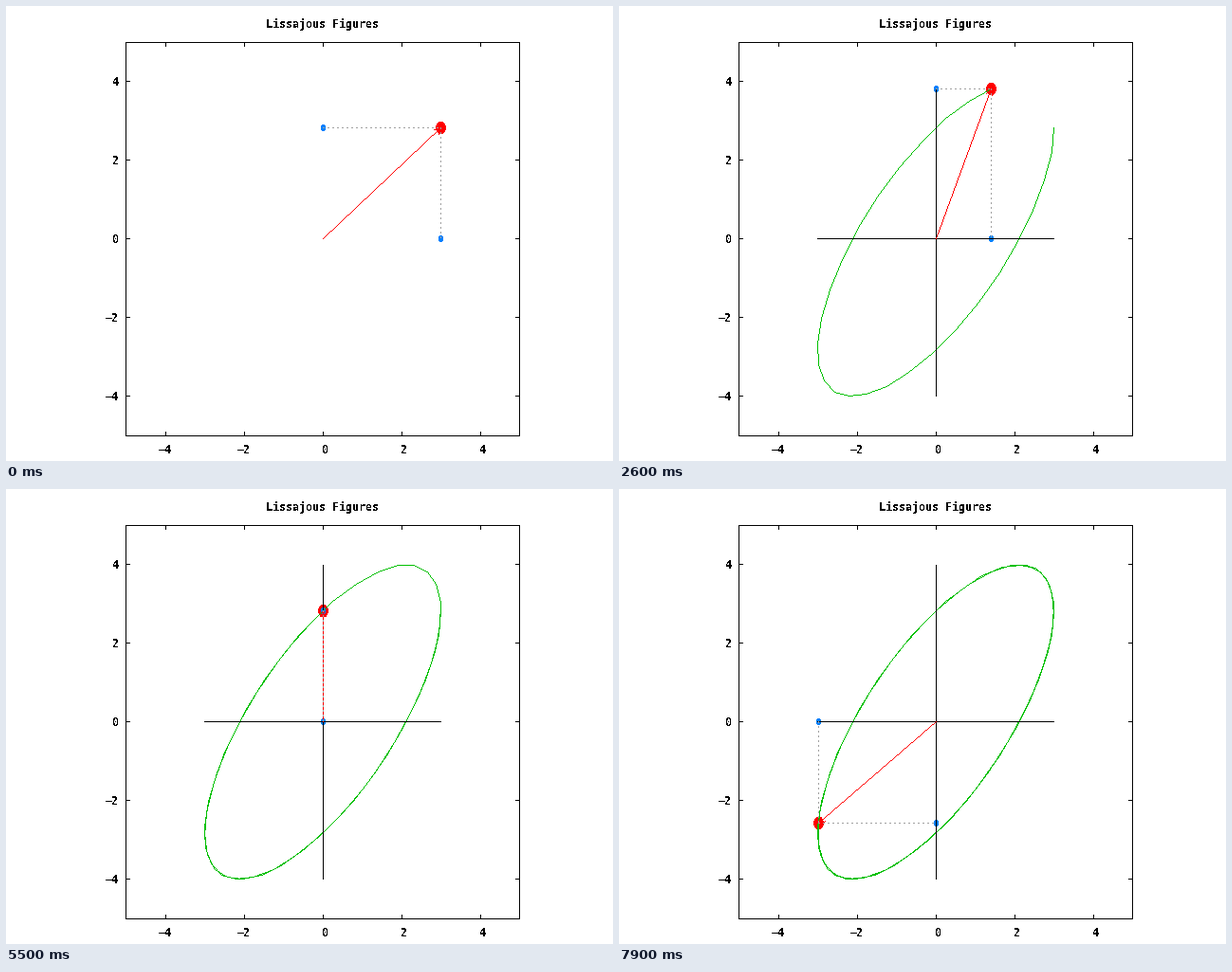
Write a matplotlib script that moves like this. It is 640x480 px and loops after 8 s.

```python
import numpy as np
import matplotlib.pyplot as plt
from matplotlib.animation import FuncAnimation
from matplotlib.collections import LineCollection

plt.rcParams.update({
    "text.antialiased": False,
    "font.family": "DejaVu Sans Mono",
    "font.weight": "bold",
    "font.size": 8.4,
})

FRAMES, STEP = 80, 0.2
LEFT, RIGHT, TOP, BOTTOM = 126, 541, 38, 453
SCALE = (RIGHT - LEFT) / 10
PX = 0.72  # one pixel in points at 100 dpi
RED, GREEN, BLUE, GREY = "#ff0000", "#00c000", "#0080ff", "#a0a0a0"

fig = plt.figure(figsize=(6.4, 4.8), dpi=100, facecolor="white")
ax = fig.add_axes([0, 0, 1, 1])
ax.set_xlim(0, 640)
ax.set_ylim(480, 0)
ax.axis("off")


def px(x):
    """Pixel column at data x."""
    return np.floor(LEFT + (np.asarray(x) + 5) * SCALE + 0.5)


def py(y):
    """Pixel row at data y."""
    return np.ceil(BOTTOM - (np.asarray(y) + 5) * SCALE - 0.5)


def raster(xs, ys):
    """Pixels of a one pixel wide polyline."""
    parts = [np.array([[xs[0], ys[0]]])]
    for x0, y0, x1, y1 in zip(xs[:-1], ys[:-1], xs[1:], ys[1:]):
        n = int(max(abs(x1 - x0), abs(y1 - y0))) + 1
        run = np.column_stack([np.linspace(x0, x1, n), np.linspace(y0, y1, n)])
        parts.append(np.floor(run + 0.5))
    return np.unique(np.vstack(parts), axis=0)


def dotted(xs, ys):
    """Two pixels on, three off, from the left or top end."""
    pts = raster(xs, ys)
    return pts[np.arange(len(pts)) % 5 < 2]


def disc(rx, ry):
    """Pixel offsets inside an upright ellipse."""
    span = np.arange(-8, 9)
    dx, dy = (g.ravel() for g in np.meshgrid(span, span))
    inside = (dx / rx) ** 2 + (dy / ry) ** 2 <= 1
    return np.column_stack([dx, dy])[inside]


def layer(color, z):
    art = LineCollection([], colors=color, linewidths=PX, zorder=z,
                         capstyle="butt", snap=False)
    return ax.add_collection(art, autolim=False)


def paint(art, pts):
    pts = np.asarray(pts, dtype=float)
    art.set_segments(np.stack([pts + (0, 0.5), pts + (1, 0.5)], axis=1))


def rule(xs, ys):
    ax.plot(np.add(xs, 0.5), np.add(ys, 0.5), color="black", lw=PX,
            antialiased=False, snap=False, zorder=1)


def draw_frame():
    l, r, t, b = LEFT, RIGHT, TOP, BOTTOM
    rule([l, r, r, l, l], [t, t, b, b, t])
    for v in range(-4, 5, 2):
        x, y = float(px(v)), float(py(v))
        for edge, inward in ((t, 4), (b, -4)):
            rule([x, x], [edge, edge + inward])
        for edge, inward in ((l, 4), (r, -4)):
            rule([edge, edge + inward], [y, y])
        label = str(v).replace("-", "\u2212")
        shift = 7 if v < 0 else 0
        ax.text(x - shift - 0.5, 472, label, ha="left", va="baseline")
        ax.text(119, y + 5, label, ha="right", va="baseline")
    ax.text(333, 23, "Lissajous Figures", ha="center", va="baseline")


draw_frame()

theta = STEP * np.arange(FRAMES)
xs = px(3 * np.cos(theta))
ys = py(4 * np.cos(theta + np.pi / 4))
ox, oy = float(px(0)), float(py(0))
BIG, SMALL = disc(5.5, 6.5), disc(2.5, 3.5)

big = layer(RED, 2)
small = layer(BLUE, 3)
curve = layer(GREEN, 4)
trails = layer("black", 5)
arrow = layer(RED, 6)
guides = layer(GREY, 7)


def arrow_path(x, y, size=7, spread=np.radians(26)):
    back = np.arctan2(oy - y, ox - x)
    a, b = ((x + size * np.cos(back + s), y + size * np.sin(back + s))
            for s in (spread, -spread))
    return zip((ox, oy), (x, y), a, (x, y), b)


def update(n):
    sx, sy = xs[:n + 1], ys[:n + 1]
    x, y = sx[-1], sy[-1]
    paint(big, BIG + (x, y))
    paint(small, np.vstack([SMALL + (x, oy), SMALL + (ox, y)]))
    paint(arrow, raster(*arrow_path(x, y)))
    paint(guides, np.vstack([dotted([x, x], [oy, y]),
                             dotted([ox, x], [y, y])]))
    if n:
        paint(curve, raster(sx, sy))
        paint(trails, np.vstack([
            raster([sx.min(), sx.max()], [oy, oy]),
            raster([ox, ox], [sy.min(), sy.max()])]))
    else:
        curve.set_segments([])
        trails.set_segments([])
    return big, small, curve, trails, arrow, guides


anim = FuncAnimation(fig, update, frames=FRAMES, interval=100,
                     repeat=True, repeat_delay=0)
plt.show()
```
